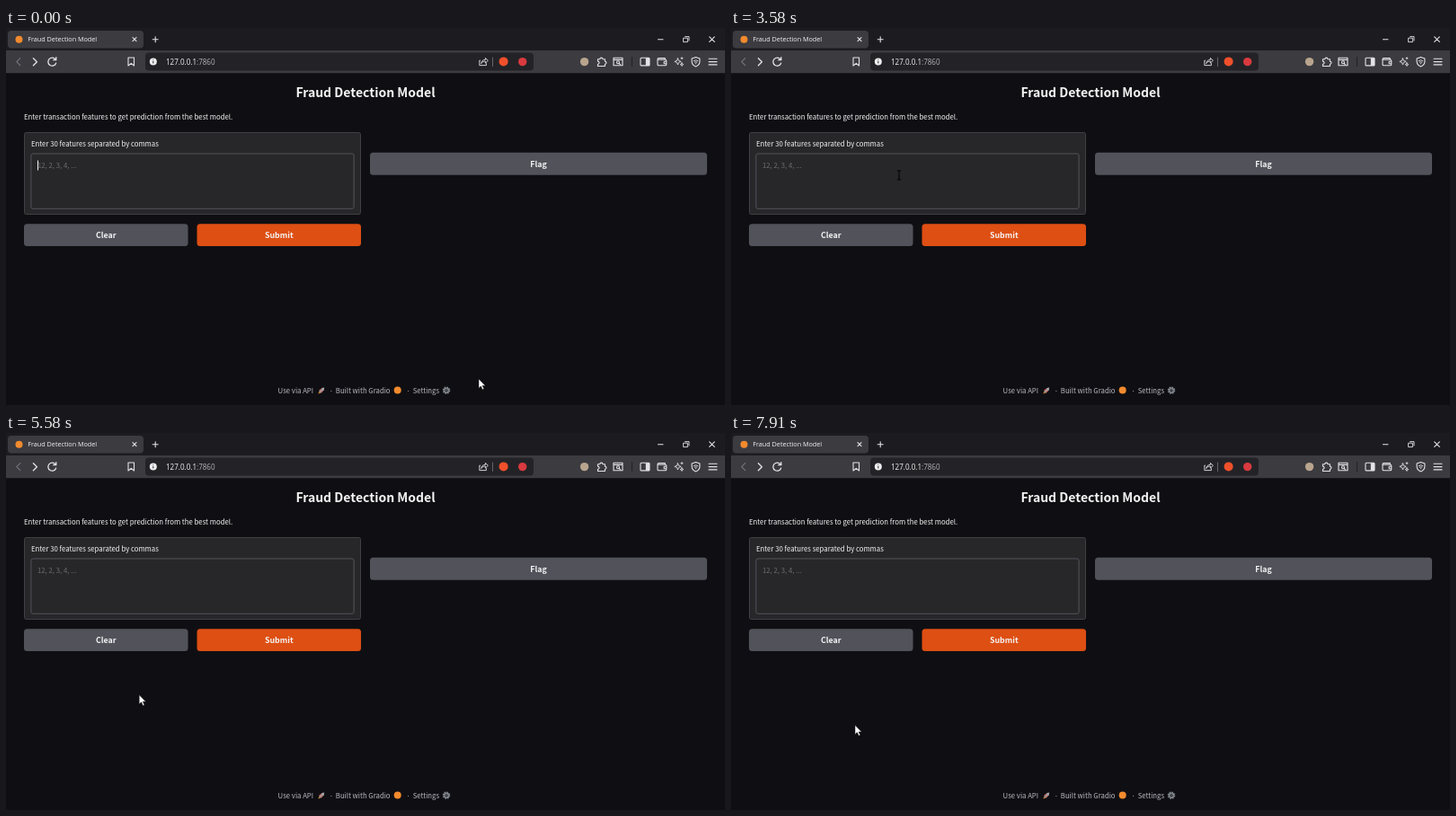
Recreate the animation shown at these times as an HTML page. Size 800 by 420 pixels, loop 8 s.

```html
<!DOCTYPE html>
<html lang="en">
<head>
<meta charset="utf-8">
<title>Fraud Detection Model</title>
<style>
  html, body { margin: 0; width: 100%; height: 100%; overflow: hidden; background: #0f0f13; }
  svg { display: block; width: 800px; height: 420px; }
  text { fill: #f4f4f5; font: 7.78px "Noto Sans CJK JP", "Noto Sans CJK SC", "Noto Sans CJK", sans-serif; white-space: pre; }
  .ui { font-family: "Open Sans", "Noto Sans", sans-serif; }
  .bold { font-weight: 700; text-anchor: middle; }
  .foot text { fill: #b9b9c0; }
  .icons { fill: none; stroke: #e4e4e7; stroke-width: 1.1; stroke-linecap: round; stroke-linejoin: round; }
  .fill { fill: #e4e4e7; stroke: none; }
</style>
</head>
<body>
<svg viewBox="0 0 800 420">
  <!-- window frame -->
  <rect width="800" height="26" fill="#1c1c20"/>
  <rect x="2" y="3" width="151" height="19.5" rx="4" fill="#3b3b40"/>
  <rect y="25" width="800" height="25.5" fill="#3b3b40"/>
  <rect x="155" y="27.5" width="432" height="20" rx="4" fill="#232327"/>
  <circle cx="14.5" cy="12.8" r="4" fill="#f28a2e"/>
  <text class="ui" x="24.3" y="15.4" style="font-size:7.22px">Fraud Detection Model</text>
  <text class="ui" x="178" y="40.7" style="font-size:8.05px">127.0.0.1<tspan fill="#b4b4ba">:7860</tspan></text>

  <g class="icons">
    <path d="M141 10.7l4 4m0-4l-4 4M163.2 12.7h6m-3-3v6"/>
    <path d="M725.5 12.7h5.5M782.7 9.8l5.6 5.6m0-5.6l-5.6 5.6"/>
    <path d="M754 11.2h4.4v4.4H754zM755.6 9.6h4.4v4.4" stroke-width=".9"/>
    <path d="M15.8 33.7l-4 4 4 4" stroke="#77777d"/>
    <path d="M30.4 33.7l4 4-4 4" stroke-width="1.3"/>
    <path d="M55 35a4.5 4.5 0 1 0 .6 4.2M55.8 32.7v3h-3" stroke-width="1.3"/>
    <path d="M136 33h6.5v9l-3.2-2.6L136 42z"/>
    <path d="M527.6 36.2h-.8v5.4h7.6v-2M528.8 39.3c.2-2.6 2-3.9 4.6-3.9v-2l3 2.9-3 2.8v-2c-2 0-3.5.4-4.6 2.2" stroke-width=".9"/>
    <path d="M541.5 33v9.5" stroke="#76767c" stroke-width=".8"/>
    <path d="M658.5 34.7h2.3a1.6 1.6 0 1 1 3.2 0h2.4v2.4a1.6 1.6 0 1 1 0 3.2v2.2h-7.9v-2.2a1.6 1.6 0 1 0 0-3.2z"/>
    <path d="M676 33.2h10v8.6h-10zM676 35.4h10"/>
    <circle cx="681" cy="38.3" r="1.5"/><path d="M682.2 39.5l1.3 1.2"/>
    <path d="M696.5 32.5v10" stroke="#232327"/>
    <rect x="706" y="33.3" width="10" height="8.6" rx="1"/>
    <path class="fill" d="M711.8 33.3h4.2v8.6h-4.2z"/>
    <path d="M733.3 35.2v-1.6h-7a1.3 1.3 0 0 0-1.3 1.3v5.6c0 .8.5 1.3 1.3 1.3h7.2c.8 0 1.3-.5 1.3-1.3v-4c0-.8-.5-1.3-1.3-1.3h-7.7M734.8 37.3h-2.6v2.4h2.6"/>
    <path d="M747.5 33.8l1 2.6 2.6 1-2.6 1-1 2.6-1-2.6-2.6-1 2.6-1zM752 38.8l.5 1.3 1.3.5-1.3.5-.5 1.3-.5-1.3-1.3-.5 1.3-.5zM752 32.7v2m-1-1h2" stroke-width=".9"/>
    <path d="M767.5 32.5l4.4 1.6v3.3c0 2.4-1.8 4.3-4.4 5.5-2.6-1.2-4.4-3.1-4.4-5.5v-3.3z"/>
    <path d="M765.2 36.6q2.3-1.8 4.6 0M766.2 38.2q1.3-1 2.6 0M767.5 39.6v.2" stroke-width=".9"/>
    <path d="M782 34.3h9m-9 3.3h9m-9 3.3h9"/>
  </g>
  <circle cx="163.8" cy="37.4" r="4" fill="#eeeef0"/>
  <path d="M163.8 36.9v2.5m0-4.3v.6" stroke="#232327"/>
  <circle cx="553.6" cy="37.4" r="5" fill="#f0502b"/>
  <circle cx="574.7" cy="37.6" r="4.7" fill="#d83a3f"/>
  <circle cx="643.6" cy="37.6" r="4.7" fill="#b9a48e"/>

  <!-- page -->
  <rect y="50.5" width="800" height="369.5" fill="#0f0f13"/>
  <text class="bold" x="400" y="76.9" style="font-size:14px">Fraud Detection Model</text>
  <text x="20" y="102">Enter transaction features to get prediction from the best model.</text>
  <rect x="20.5" y="116.5" width="374" height="91" rx="2" fill="#27272a" stroke="#3f3f46"/>
  <text x="28" y="131.8">Enter 30 features separated by commas</text>
  <rect x="27.9" y="140" width="359.2" height="61.3" rx="2" fill="#27272a" stroke="#52525b"/>
  <text x="35" y="156" style="fill:#6c6c74">12, 2, 3, 4, ...</text>
  <rect id="caret" x="35" y="147.5" width="1" height="11" fill="#f4f4f5"/>
  <rect x="405" y="138.7" width="375" height="25" rx="3.5" fill="#52525b"/>
  <rect x="20" y="218.3" width="182.5" height="24.7" rx="3.5" fill="#52525b"/>
  <rect x="212.5" y="218.3" width="182.5" height="24.7" rx="3.5" fill="#de4f13"/>
  <g class="bold">
    <text x="592.5" y="154.9" style="font-size:8.8px;font-weight:700">Flag</text>
    <text x="111.2" y="234.4" style="font-size:8.8px;font-weight:700">Clear</text>
    <text x="303.8" y="234.4" style="font-size:8.8px;font-weight:700">Submit</text>
  </g>

  <g class="foot">
    <text x="302.6" y="406.5">Use via API</text>
    <text x="359.7" y="406.5">·</text>
    <text x="366.8" y="406.5">Built with Gradio</text>
    <text x="445.6" y="406.5">·</text>
    <text x="452.7" y="406.5">Settings</text>
    <path d="M348 404.7l3.5-3.6 2.8-.6-.5 2.8-3.6 3.6z" fill="#a5a2a6"/>
    <path d="M348.4 403.2l1.7-1.3h1.3l-2.4 2.6zM350.4 406.6l2.1-1.6v-1.4l-2.6 2.4z" fill="#c24a3a"/>
    <path d="M347.5 407.5l.6-2.2 1.5 1.4z" fill="#ef9b35"/>
    <circle cx="435.7" cy="403.6" r="4" fill="#f28a2e"/>
    <circle cx="490" cy="403.7" r="3.6" fill="none" stroke="#81868d" stroke-width="1.4" stroke-dasharray="1.6 1.227"/>
    <circle cx="490" cy="403.7" r="2.4" fill="none" stroke="#81868d" stroke-width="1.7"/>
    <circle cx="490" cy="403.7" r=".8" fill="#81868d"/>
  </g>

  <!-- mouse -->
  <path id="arrow" d="M0 0v10.2l2.4-2.2 1.7 3.8 1.7-.7-1.7-3.7h3.2z" fill="#fff" stroke="#17171a" stroke-width=".5"/>
  <path id="beam" d="M-2.2-5h1.6L0-4.5.6-5h1.6M0-4.5v9M-2.2 5h1.6L0 4.5.6 5h1.6" fill="none" stroke="#020203" stroke-width="1.1"/>
</svg>
<script>
  const LOOP = 8000, FPS = 12;
  const caretOn = [[0, 910], [1410, 2000], [2500, 3580]];
  // time, x, y of the mouse; off stage below y 420
  const path = [
    [0, 526, 391], [90, 526, 391], [250, 530, 402], [330, 534, 430],
    [2420, 240, 430], [3000, 187, 164], [4000, 187, 164],
    [6000, 138, 325.5], [LOOP, 138, 325.5]
  ];
  const [caret, arrow, beam] = ["caret", "arrow", "beam"].map(id => document.getElementById(id));
  const show = (el, on) => el.setAttribute("visibility", on ? "visible" : "hidden");

  function mouseAt(t) {
    const i = Math.max(1, path.findIndex(p => p[0] >= t));
    const [t0, x0, y0] = path[i - 1], [t1, x1, y1] = path[i];
    const k = (t - t0) / (t1 - t0);
    return [x0 + (x1 - x0) * k, y0 + (y1 - y0) * k];
  }

  function draw(now) {
    const time = now % LOOP;
    const t = Math.min(LOOP, Math.floor((time + 7) * FPS / 1000) * 1000 / FPS);
    const [x, y] = mouseAt(t);
    const inBox = x > 28 && x < 387 && y > 140 && y < 201;
    const place = `translate(${x} ${y})`;
    arrow.setAttribute("transform", place);
    beam.setAttribute("transform", place);
    show(arrow, !inBox);
    show(beam, inBox);
    show(caret, caretOn.some(([a, b]) => time >= a && time < b));
    requestAnimationFrame(() => draw(performance.now()));
  }
  draw(0);
</script>
</body>
</html>
```
